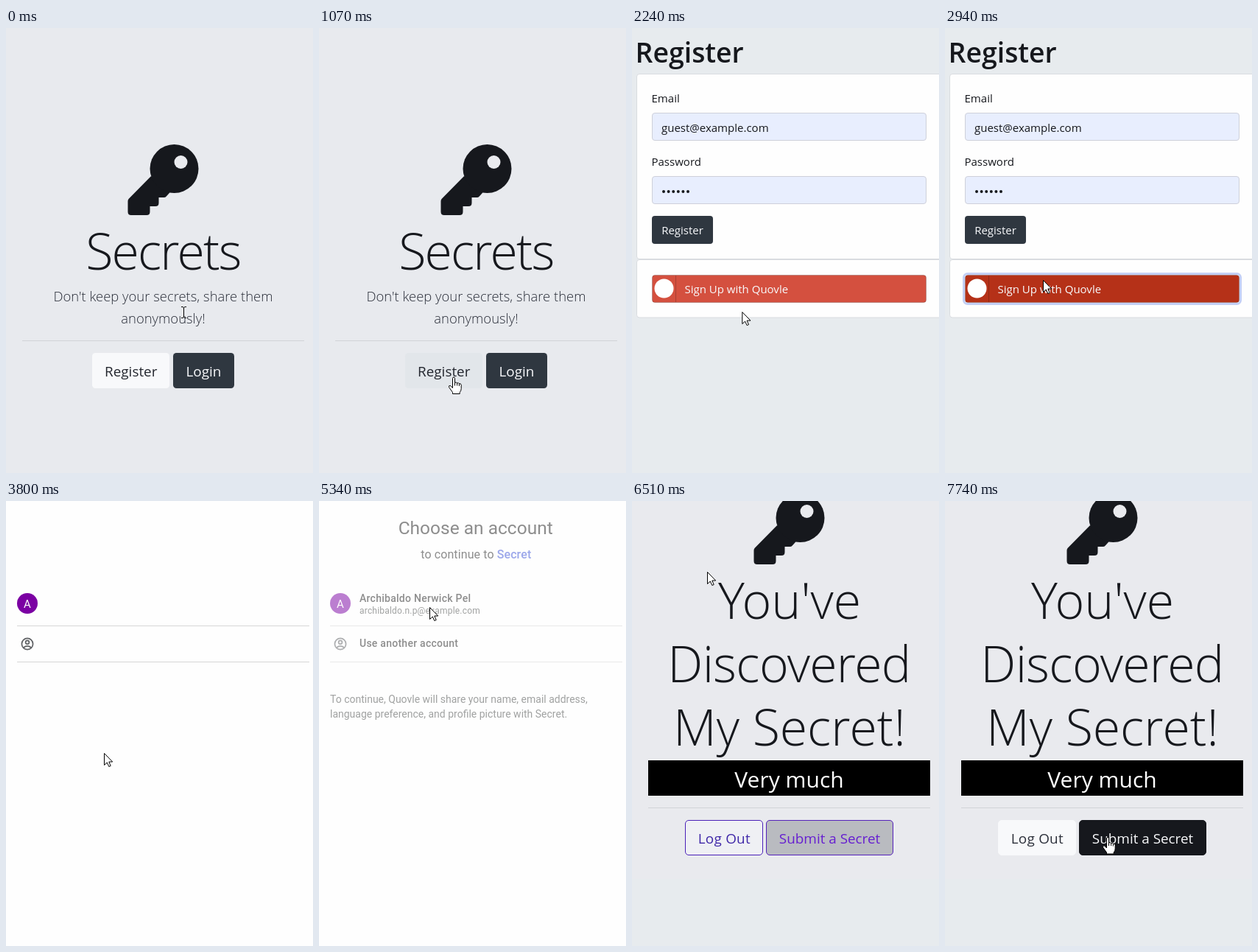
Animation of 417 by 604 pixels, one loop 8 s. Source, as an HTML page:

```html
<!DOCTYPE html>
<html lang="en">
<head>
<meta charset="utf-8">
<title>Secrets</title>
<style>
html, body { margin: 0; width: 100%; height: 100%; overflow: hidden; background: #fff; }
svg { display: block; width: 417px; height: 604px; }
text { font: 15px "Open Sans", "Noto Sans", sans-serif; fill: #16181d; white-space: pre; }
.mid { text-anchor: middle; }
.big { font-size: 68px; font-weight: 300; }
.lead { font-size: 18.45px; font-weight: 300; fill: #2b2f3a; }
.btn { font-size: 18.9px; text-anchor: middle; fill: #23262e; }
.light { fill: #f8f9fb; }
text.light { font-weight: 500; }
.dark { fill: #2f3740; }
.field { fill: #fff; stroke: #ced0da; }
.card { fill: #fefefe; stroke: #d9dce0; }
.rule { stroke: #d1d3d7; }
#chooser text { font-family: Roboto, "Noto Sans", sans-serif; font-size: 14px; fill: #1f1f1f; }
#chooser .soft { fill: #444746; }
#chooser .name { font-weight: 500; letter-spacing: .25px; }
.cursor path { stroke: #000; stroke-linejoin: round; fill: #fff; }
</style>
</head>
<body>
<svg viewBox="0 0 417 604">
  <defs>
    <g id="key">
      <path fill="#16181d" d="M31.6 43 1.3 73.7Q0 75 0 77V91.5Q0 96 4.5 96H25.5Q30 96 30 91.5V84H37.5Q42 84 42 79.5V72H49Q51 72 52.3 70.5L56.8 65.4Z"/>
      <circle cx="63" cy="33" r="33" fill="#16181d"/>
      <circle cx="72" cy="24" r="9" fill="#e9eaee"/>
    </g>
  </defs>

  <g id="home">
    <rect width="417" height="604" fill="#e8eaee"/>
    <use href="#key" x="165.5" y="158"/>
    <text class="big mid" x="213.500" y="327.500" letter-spacing="-1.900">Secrets</text>
    <text class="lead mid" x="213.500" y="371">Don't keep your secrets, share them</text>
    <text class="lead mid" x="213.500" y="401">anonymously!</text>
    <path class="rule" d="M22 424.500H405"/>
    <rect id="join" x="117" y="441" width="105" height="48" rx="4.500"/>
    <text class="btn" x="169.700" y="473">Register</text>
    <rect class="dark" x="227" y="441" width="83" height="48" rx="4.500"/>
    <text class="btn light" x="268.500" y="473">Login</text>
  </g>

  <g id="form">
    <rect width="417" height="604" fill="#e7ebee"/>
    <text x="4.500" y="46.500" style="font-size:37.400px;font-weight:600">Register</text>
    <rect class="card" x="6.500" y="62.500" width="430" height="251" rx="3.500"/>
    <rect class="card" x="6.500" y="314.500" width="430" height="78.500" rx="3.500"/>
    <text x="26.500" y="101">Email</text>
    <rect class="field" x="27.500" y="115.500" width="372" height="37" rx="3.500"/>
    <text x="26.500" y="187">Password</text>
    <rect class="field" x="27.500" y="201.500" width="372" height="37" rx="3.500"/>
    <g id="filled">
      <text x="40" y="141">guest@example.com</text>
      <path d="M43 222H77" stroke="#16181d" stroke-width="4" stroke-linecap="round" stroke-dasharray="0 6.6"/>
    </g>
    <rect class="dark" x="27" y="255" width="83" height="38" rx="4"/>
    <text class="light mid" x="68.500" y="280">Register</text>
    <rect id="ring" x="25.500" y="333.500" width="376" height="41" rx="5" fill="none" stroke="#c3cff5" stroke-width="3"/>
    <rect id="brand" x="27.500" y="335.500" width="372" height="37" rx="3.500" stroke="#000" stroke-opacity=".2"/>
    <path d="M59.500 336V372" stroke="#000" stroke-opacity=".2"/>
    <circle cx="43.500" cy="353.500" r="13" fill="#fff"/>
    <text class="light" x="71.500" y="360">Sign Up with Quovle</text>
  </g>

  <g id="blank"><rect width="417" height="604" fill="#fefefe"/></g>
  <g id="chooser">
    <circle cx="29" cy="139" r="14" fill="#7b00a3"/>
    <text class="mid" x="29" y="144.500" style="fill:#fff;font-size:15px">A</text>
    <path d="M15 169.500H412M15 218.500H412" stroke="#d6d6d6"/>
    <g fill="none" stroke="#5f6164" stroke-width="1.700">
      <circle cx="29" cy="194" r="7.600"/>
      <circle cx="29" cy="191.800" r="2.400"/>
      <path d="M23.800 199Q29 194.800 34.200 199"/>
    </g>
    <g id="words">
      <text class="mid" x="212.700" y="45" style="font-size:24.500px">Choose an account</text>
      <text class="mid" x="213.300" y="78" style="font-size:16px;letter-spacing:.1px">to continue to <tspan fill="#3b52d8" font-weight="500">Secret</tspan></text>
      <text class="name" x="55" y="137">Archibaldo Nerwick Pel</text>
      <text class="soft" x="55" y="153" style="font-size:12px;letter-spacing:.2px">archibaldo.n.p@example.com</text>
      <text class="name" x="55" y="198">Use another account</text>
      <text class="soft" x="15" y="274">To continue, Quovle will share your name, email address,</text>
      <text class="soft" x="15" y="294">language preference, and profile picture with Secret.</text>
    </g>
  </g>

  <g id="secret">
    <rect width="417" height="604" fill="#e7ebee"/>
    <rect width="417" height="513" fill="#e9eaee"/>
    <use href="#key" x="165.5" y="-10"/>
    <text class="big mid" x="214" y="159.500">You've</text>
    <text class="big mid" x="213.500" y="245.500" letter-spacing="-.700">Discovered</text>
    <text class="big mid" x="214" y="331.500">My Secret!</text>
    <rect x="22" y="352" width="383" height="48"/>
    <text class="mid" x="213.500" y="389" style="fill:#fff;font-size:30px">Very much</text>
    <path class="rule" d="M22 416.500H405"/>
    <rect id="out" x="72.500" y="433.500" width="105" height="47" rx="4.500"/>
    <text id="outText" class="btn" x="125.300" y="465" letter-spacing=".250">Log Out</text>
    <rect id="submit" x="182.500" y="433.500" width="172" height="47" rx="4.500"/>
    <text id="submitText" class="btn light" x="268.500" y="465">Submit a Secret</text>
  </g>

  <g id="beam" class="cursor"><path style="fill:none" d="M-3 -7.500H-1L.5 -6.500 2 -7.500H4M.5 -6.500V6.500M-3 7.500H-1L.5 6.500 2 7.500H4"/></g>
  <g id="arrow" class="cursor"><path d="M.5 .5V16.500L4.300 13 6.800 18.500 9.200 17.500 6.800 12H11.700Z"/></g>
  <g id="hand" class="cursor"><path d="M-1.500 1.500Q-1.500 0 0 0T1.500 1.500V7.500Q3.200 6.200 4.600 8 6.400 6.800 7.400 8.800 9.700 8 10.200 10.500V15.500Q10.200 18.500 8.200 20.500V22.500H-1.500V20.500L-6.500 13.500Q-7 10.800 -4.300 11.500L-1.500 14.500ZM1.500 7.500V11.500M4.600 8V11.500M7.400 8.800V12"/></g>
</svg>
<script>
const $ = id => document.getElementById(id);
const clamp = v => Math.max(0, Math.min(1, v));
const ramp = (t, start, length = 150) => clamp((t - start) / length);
const mix = (a, b, k) => `color-mix(in srgb, ${b} ${k * 100}%, ${a})`;
const show = (id, on) => { $(id).style.display = on ? "" : "none"; };
const paint = (id, a, b, k, prop = "fill") => { $(id).style[prop] = mix(a, b, k); };

// time, x, y of the pointer's hot spot
const path = [
  [0, 241, 386], [300, 241, 386], [760, 183, 474], [2000, 183, 474],
  [2390, 133, 342], [4260, 133, 342], [4950, 150, 144], [6080, 150, 144],
  [6510, 102, 96], [6570, 102, 96], [6880, 138, 243], [6960, 138, 243],
  [7340, 208, 411], [7460, 208, 411], [7740, 221, 456.5], [8000, 221, 456.5]
];
const shapes = [
  [0, "beam"], [400, "arrow"], [590, "hand"], [2000, "arrow"], [2270, "hand"],
  [2780, "arrow"], [4800, "hand"], [5200, "arrow"], [7590, "hand"]
];

function pointer(t) {
  const i = path.findIndex(p => p[0] > t);
  const [a, b] = [path[i - 1], path[i]];
  let k = (t - a[0]) / (b[0] - a[0]);
  k *= k * (3 - 2 * k);
  const at = n => a[n] + (b[n] - a[n]) * k;
  const shape = shapes.filter(s => s[0] <= t).pop()[1];
  for (const id of ["beam", "arrow", "hand"]) show(id, id === shape);
  $(shape).setAttribute("transform", `translate(${at(1)} ${at(2)})`);
}

function draw(t) {
  show("home", t < 1370);
  show("form", t >= 1370 && t < 3020);
  show("blank", t >= 3020 && t < 6500);
  show("chooser", t >= 3800 && t < 6500);
  show("words", t >= 4030);
  show("secret", t >= 6500);

  paint("join", "#f8f9fb", "#e2e6ea", ramp(t, 590));

  const filled = t >= 1450;
  show("filled", filled);
  for (const f of document.querySelectorAll(".field")) f.style.fill = filled ? "#e8eefe" : "#fff";
  paint("brand", "#d4503f", "#b53118", ramp(t, 2270, 100));
  $("ring").style.opacity = ramp(t, 2620);

  $("chooser").style.opacity = 1 - ramp(t, 5100, 240) / 2;

  // link colours settle into button colours, then the pointer arrives
  const k = ramp(t, 6560, 120), hover = ramp(t, 7590);
  const dark = mix("#2f3740", "#16181d", hover);
  paint("out", "#eff0f4", "#f8f9fb", k);
  paint("out", "#4a20b8", "#f8f9fb", k, "stroke");
  paint("outText", "#3f27a8", "#2b2f3a", k);
  paint("submit", "#b9bbc0", dark, k);
  paint("submit", "#5522bb", dark, k, "stroke");
  paint("submitText", "#661fd0", "#f8f9fb", k);

  pointer(t);
}

function tick() {
  draw(performance.now() % 8000);
  requestAnimationFrame(tick);
}
tick();
</script>
</body>
</html>
```
